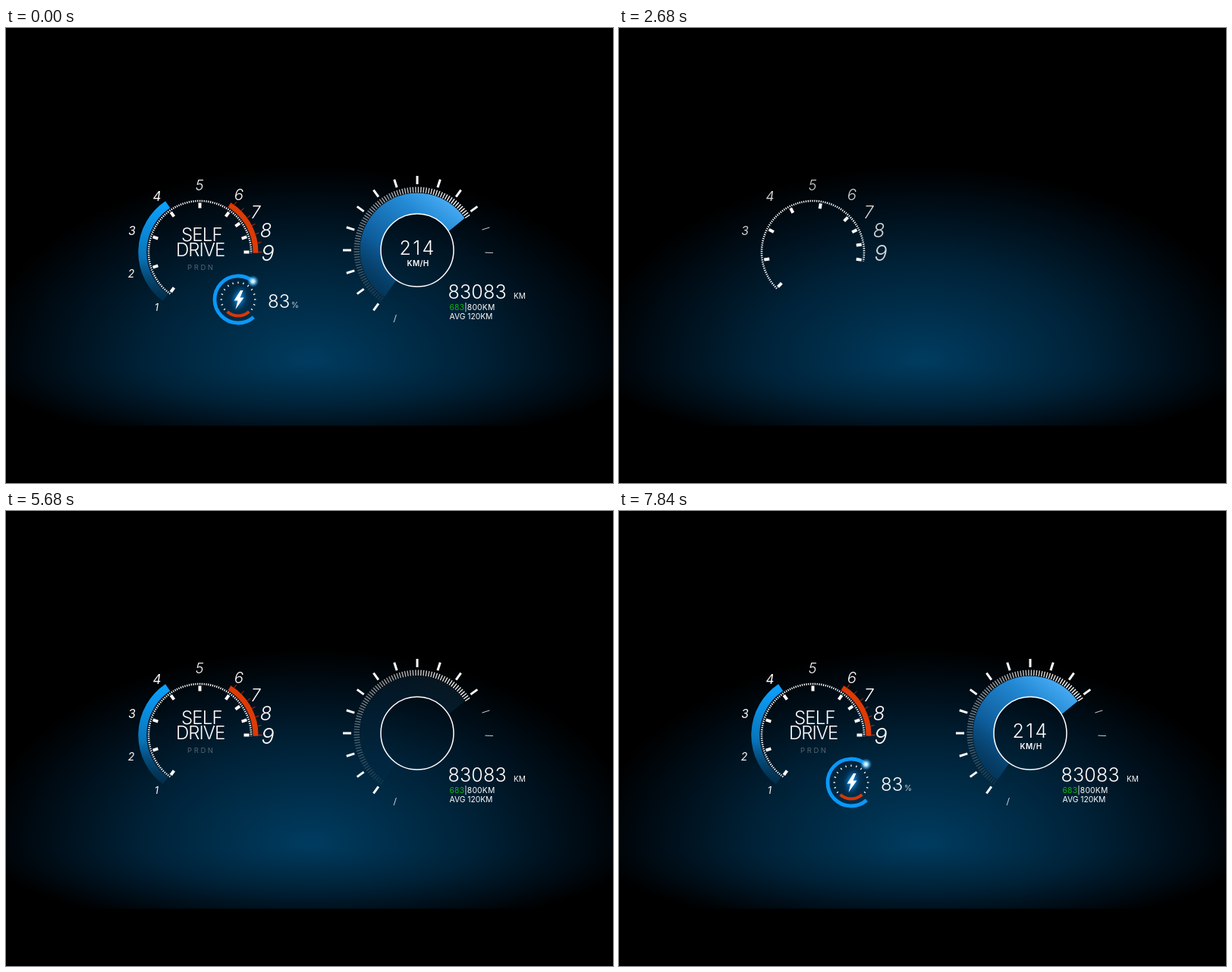
Write an HTML page that moves like this. It is 800 px wide and 600 px high and loops after 9840 ms.

```html
<!DOCTYPE html>
<html lang="en">
<head>
<meta charset="utf-8">
<title>Dashboard</title>
<style>
  html, body { margin: 0; width: 100%; height: 100%; overflow: hidden; background: #000; }
  svg { display: block; width: 800px; height: 600px; }
  text { font-family: Inter, "DejaVu Sans", sans-serif; fill: #fff; }
  .light { font-weight: 300; }
  #numbers text { font-style: italic; text-anchor: middle; }
  .bolt { fill: #fff; filter: drop-shadow(0 0 3px #1aa0ff) drop-shadow(0 0 5px #0a78d0); }
</style>
</head>
<body>
<svg viewBox="0 0 800 600" fill="none">
  <defs>
    <radialGradient id="glow">
      <stop offset="0" stop-color="#003c60"/>
      <stop offset=".5" stop-color="#002238"/>
      <stop offset=".8" stop-color="#000d17"/>
      <stop offset="1" stop-color="#000"/>
    </radialGradient>
    <linearGradient id="powerFill" gradientUnits="userSpaceOnUse" x1="0" y1="230" x2="0" y2="364">
      <stop offset="0" stop-color="#0ca2ff"/>
      <stop offset=".55" stop-color="#0873b8"/>
      <stop offset="1" stop-color="#06436d" stop-opacity=".3"/>
    </linearGradient>
    <linearGradient id="speedFill" gradientUnits="userSpaceOnUse" x1="490" y1="355" x2="585" y2="225">
      <stop offset="0" stop-color="#07406a" stop-opacity=".5"/>
      <stop offset=".35" stop-color="#0d5c9a"/>
      <stop offset=".75" stop-color="#2389d4"/>
      <stop offset="1" stop-color="#4aaef6"/>
    </linearGradient>
    <radialGradient id="spark">
      <stop offset="0" stop-color="#fff"/>
      <stop offset=".3" stop-color="#a8e2ff"/>
      <stop offset="1" stop-color="#0a96f5" stop-opacity="0"/>
    </radialGradient>
    <clipPath id="above"><path d="M0 0H800V440H0z"/></clipPath>
    <clipPath id="below"><path d="M0 440H800V524.5H0z"/></clipPath>
  </defs>

  <ellipse cx="400" cy="440" rx="435" ry="258" fill="url(#glow)" clip-path="url(#above)"/>
  <ellipse cx="400" cy="440" rx="435" ry="115" fill="url(#glow)" clip-path="url(#below)"/>

  <g id="bars"></g>
  <g id="ring" stroke="#fff"></g>
  <g id="numbers"></g>

  <g id="mode">
    <text class="light" x="231" y="281" font-size="24" letter-spacing="-.8">SELF</text>
    <text class="light" x="224" y="301" font-size="24" letter-spacing="-1">DRIVE</text>
    <text x="239" y="319" font-size="9.5" letter-spacing="2.6" opacity=".32">PRDN</text>
  </g>

  <g id="speedFillLayer">
    <path id="speedSector" fill="url(#speedFill)"/>
  </g>
  <g id="outerTicks" stroke="#fff"></g>
  <g id="innerTicks" stroke="#fff"></g>
  <circle id="hub" cx="542" cy="293" r="48" stroke="#fff" stroke-width="1.5"/>
  <g id="speed">
    <text x="518.5" y="298.5" font-size="25" class="light" letter-spacing="2.4">214</text>
    <text x="528.5" y="314" font-size="10" font-weight="600" letter-spacing=".4">KM/H</text>
  </g>

  <g id="odometer">
    <text class="light" x="582.5" y="357" font-size="25" letter-spacing=".2">83083</text>
    <text x="669" y="356.5" font-size="10">KM</text>
    <text x="584.5" y="372" font-size="10.3" letter-spacing=".2"><tspan fill="#0fb40f">683</tspan>|800KM</text>
    <text x="584.5" y="384" font-size="10.3">AVG 120KM</text>
  </g>

  <g id="battery">
    <g id="batteryDial"></g>
    <circle cx="325.5" cy="334" r="8" fill="url(#spark)"/>
    <path class="bolt" d="M309 346L300.5 359.5H305.5L302.5 371L313.5 355.5H308.5L312.5 346z"/>
    <text class="light" x="345" y="369" font-size="24">83</text>
    <text class="light" x="376" y="369" font-size="10.5">%</text>
  </g>
</svg>

<script>
const LOOP = 9840, INTRO = 1000, STEP = 30;
const $ = id => document.getElementById(id);

// Angles are in degrees, clockwise from the top.
const polar = ([cx, cy], r, deg) => {
  const a = deg * Math.PI / 180;
  return `${(cx + r * Math.sin(a)).toFixed(2)} ${(cy - r * Math.cos(a)).toFixed(2)}`;
};
const arcPath = (c, r, from, to) =>
  `M${polar(c, r, from)}A${r} ${r} 0 ${+(to - from > 180)} 1 ${polar(c, r, to)}`;
const arc = (c, r, from, to, width, color, extra = '') =>
  `<path d="${arcPath(c, r, from, to)}" stroke="${color}" stroke-width="${width}" ${extra}/>`;
const tick = (c, r1, r2, deg, width, opacity = 1) =>
  `<path d="M${polar(c, r1, deg)}L${polar(c, r2, deg)}" stroke-width="${width}" opacity="${opacity}"/>`;
const times = (n, make) => Array.from({ length: n }, (_, i) => make(i)).join('');

const REV = [255.5, 295.5], SPEED = [542, 293], CELL = [306, 358];

$('bars').innerHTML =
  arc(REV, 75.7, 217, 326, 11, 'url(#powerFill)') +
  arc(REV, 73.5, 32, 91, 7, '#de3a05') +
  `<g stroke="#c03208">${times(7, i => tick(REV, 77, 82, 36 + 9 * i, 1))}</g>`;

const majorAngles = [216, 252, 288, 324, 0, 36, 54, 72, 90];
$('ring').innerHTML =
  arc(REV, 67.5, 215.5, 451, 2.6, '#fff', 'pathLength="235.5" stroke-dasharray="1.1 1.3"') +
  majorAngles.map(deg => tick(REV, 58, 65, deg, 4)).join('');

// x, baseline, font size for the numbers 1 to 9
const numberSpots = [
  [198.5, 373, 13], [165, 329, 14], [166, 273, 15.5], [199, 228, 17], [255, 214, 18.5],
  [307, 227, 20.5], [329, 250.5, 22.5], [342.5, 276, 25.5], [345, 307, 29]
];
$('numbers').innerHTML = numberSpots.map(([x, y, size], i) =>
  `<text x="${x}" y="${y}" font-size="${size}" font-weight="${size > 18 ? 300 : 400}">${i + 1}</text>`).join('');
const numbers = [...$('numbers').children];

$('speedSector').setAttribute('d',
  `${arcPath(SPEED, 75.5, 215, 416)}L${polar(SPEED, 48, 419)}` +
  `A48 48 0 1 0 ${polar(SPEED, 48, 215)}z`);
$('outerTicks').innerHTML =
  times(12, i => tick(SPEED, 87, 98, 216 + 18 * i, 3)) +
  [198, 72.5, 92].map(deg => tick(SPEED, 89.5, 100, deg, 1, .8)).join('');
$('innerTicks').innerHTML = times(81, i =>
  tick(SPEED, 76, 83.5, 216 + 2.5 * i, 1.4, Math.min(1, .08 + i / 80)));

$('batteryDial').innerHTML =
  arc(CELL, 31, 139, 400, 4.8, '#0b98f8') +
  arc(CELL, 21.5, 138, 222, 4, '#d8380a') +
  `<g stroke="#fff">${times(15, i => tick(CELL, 21, 23.5, 234 + 18 * i, 1.3))}</g>`;

const progress = (t, from, to) => Math.min(1, Math.max(0, (t - from) / (to - from)));

const fades = {
  ring: [1000, 1620],
  numbers: [1000, 3050],
  bars: [2800, 3550],
  mode: [3790, 4900],
  outerTicks: [3790, 4870],
  innerTicks: [4400, 5770],
  hub: [4600, 5680],
  odometer: [4780, 5650],
  speedFillLayer: [5560, 6700],
  speed: [6250, 7450],
  battery: [6490, 7840]
};

function draw(t) {
  for (const id in fades) $(id).setAttribute('opacity', progress(t, ...fades[id]));
  const turn = 137.5 * (1 - progress(t, 1000, 2800));
  $('ring').setAttribute('transform', `rotate(${turn} ${REV})`);
  numbers.forEach((el, i) => {
    el.style.visibility = t >= 1100 + 240 * (8 - i) ? 'visible' : 'hidden';
  });
}

const start = performance.now();
function frame() {
  const t = (performance.now() - start) % LOOP;
  draw(t < INTRO ? LOOP : INTRO + Math.floor((t - INTRO) / STEP) * STEP);
  requestAnimationFrame(frame);
}
frame();
</script>
</body>
</html>
```
